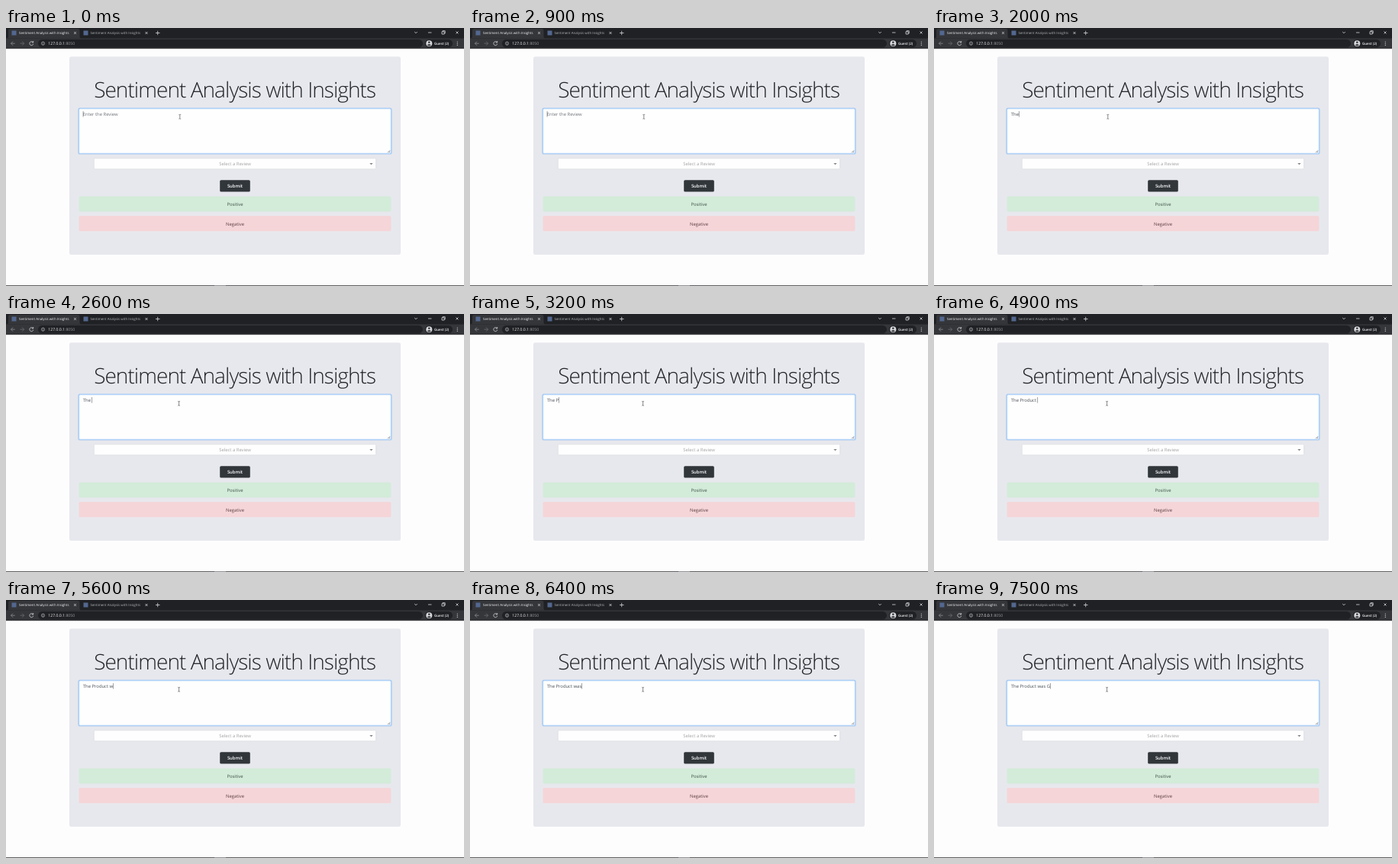
Recreate the animation shown at these times as an HTML page. Size 600x338 px, loop 8000 ms.

```html
<!DOCTYPE html>
<html lang="en">
<head>
<meta charset="utf-8">
<title>Sentiment Analysis with Insights</title>
<style>
  html, body { margin: 0; width: 100%; height: 100%; overflow: hidden; background: #fdfdfe; }
  svg { display: block; width: 600px; height: 338px; }
  text {
    font-family: "Open Sans", "Noto Sans", sans-serif;
    font-size: 5.9px;
    white-space: pre;
    text-rendering: geometricPrecision;
  }
  .heading { font-size: 28px; font-weight: 300; letter-spacing: -.034em; fill: #202327; }
  .tab { font-size: 4.4px; font-weight: 500; }
  .mid { text-anchor: middle; }
  .line { fill: none; stroke: #d5d7da; stroke-width: .8; }
</style>
</head>
<body>
<svg viewBox="0 0 600 338">
  <defs>
    <path id="cross" d="M-1.5-1.5 1.5 1.5M1.5-1.5-1.5 1.5"/>
  </defs>

  <!-- browser tabs -->
  <rect width="600" height="14" fill="#202124"/>
  <path d="M0 13.5Q3 13.5 3 11V3.5Q3 1 5.5 1H94Q96.5 1 96.5 3.5V11Q96.5 13.5 99 13.5Z" fill="#35363a"/>
  <rect x="7.5" y="3.5" width="6" height="6" fill="#52688f"/>
  <rect x="101.5" y="3.5" width="6" height="6" fill="#52688f"/>
  <text class="tab" x="17" y="8.2" fill="#f4f5f6">Sentiment Analysis with Insights</text>
  <text class="tab" x="110.5" y="8.2" fill="#b4b7bb">Sentiment Analysis with Insights</text>
  <g class="line">
    <use href="#cross" x="90.5" y="6.5"/>
    <use href="#cross" x="184" y="6.5"/>
    <path d="M196 6.5H201.5M198.7 3.8V9.2"/>
    <path d="M535.2 5 537 6.8 538.8 5M553 6H557.5"/>
    <path d="M571 4.8H574.2V8H571ZM572 4.8V3.7H575.2V7H574.2"/>
    <use href="#cross" x="591" y="6"/>
  </g>

  <!-- address bar -->
  <rect y="13.5" width="600" height="13.7" fill="#35363a"/>
  <rect x="42" y="15" width="504" height="10.5" rx="5.25" fill="#202124"/>
  <rect x="549" y="15" width="36" height="10.5" rx="5.25" fill="#202124"/>
  <g class="line">
    <path d="M11.7 20.2H6.5M9 17.7 6.5 20.2 9 22.7" stroke="#8f9195"/>
    <path d="M18.5 20.2H23.7M21.2 17.7 23.7 20.2 21.2 22.7" stroke="#6b6d71"/>
    <path d="M35.3 18.6A2.5 2.5 0 1 0 35.8 20.8M35.7 17V19H33.7"/>
    <circle cx="48.5" cy="20.2" r="2.1" stroke-width=".6"/>
    <path d="M48.5 19.9V21.4M48.5 18.8V19.3" stroke-width=".6"/>
  </g>
  <text x="55.3" y="22.1" style="font-size:5.15px" fill="#f1f2f4">127.0.0.1<tspan fill="#999ca1">:8050</tspan></text>
  <circle cx="554.3" cy="20.2" r="4" fill="#d5d7da"/>
  <circle cx="554.3" cy="18.8" r="1.3" fill="#35363a"/>
  <path d="M551.7 22.5Q554.3 19.5 556.9 22.5Q554.3 24.5 551.7 22.5" fill="#35363a"/>
  <text x="561" y="21.9" style="font-size:4.5px;font-weight:600" fill="#f1f2f4">Guest (2)</text>
  <g fill="#d5d7da">
    <circle cx="591.3" cy="18" r=".6"/><circle cx="591.3" cy="20.2" r=".6"/><circle cx="591.3" cy="22.4" r=".6"/>
  </g>

  <!-- page -->
  <rect x="83" y="37.5" width="434" height="259.5" rx="2.3" fill="#e7e8ed"/>
  <text class="heading mid" x="299.6" y="91">Sentiment Analysis with Insights</text>

  <rect x="94.3" y="104.4" width="411.4" height="61.2" rx="2.6" fill="#adcdf2"/>
  <rect x="95.7" y="105.8" width="408.6" height="58.4" rx="1.5" fill="#fefefe" stroke="#80bdff" stroke-width=".4"/>
  <path d="M500.2 163.2 503.2 160.2M501.9 163.2 503.2 161.9" stroke="#444" stroke-width=".6"/>

  <rect x="115.3" y="170.8" width="369.4" height="14" rx="1.3" fill="#fefefe" stroke="#cfd0d4" stroke-width=".5"/>
  <text class="mid" x="300" y="180" fill="#a3a3a6">Select a Review</text>
  <path d="M476.3 177.1H480.7L478.5 179.3Z" fill="#85878b"/>

  <rect x="280.2" y="199.2" width="39.6" height="15.4" rx="1.6" fill="#31363b"/>
  <text class="mid" x="300" y="209.2" font-weight="600" fill="#fff">Submit</text>

  <rect x="95.5" y="220.4" width="409" height="20" rx="1.6" fill="#d3ebd9"/>
  <text class="mid" x="300" y="232.7" fill="#3f5247">Positive</text>
  <rect x="95.5" y="246.2" width="409" height="20" rx="1.6" fill="#f5d5d8"/>
  <text class="mid" x="300" y="258.5" fill="#5c3f43">Negative</text>

  <rect y="337" width="600" height="1" fill="#5f6062"/>
  <rect x="273" y="337" width="15" height="1" fill="#8d9095"/>

  <!-- moving parts -->
  <text id="hint" x="100.8" y="115.3" fill="#70757c">Enter the Review</text>
  <text id="typed" x="100.8" y="115.3" fill="#495057"></text>
  <rect id="caret" y="109" width=".5" height="7.5" fill="#44484d"/>
  <path id="pointer" d="M-1.4-2.8H-.5L0-2.4 .5-2.8H1.4M0-2.4V2.4M-1.4 2.8H-.5L0 2.4 .5 2.8H1.4" fill="none" stroke="#2b2b2b" stroke-width=".55"/>
</svg>
<script>
  const LOOP = 8000;
  const REVIEW = "The Product was G";
  const TEXT_LEFT = 100.8;
  // [time in ms, letters typed, caret visible]
  const STEPS = [
    [0, 0, 1], [400, 0, 0], [900, 0, 1], [1300, 1, 1], [1600, 2, 1], [2000, 3, 1],
    [2200, 4, 1], [2700, 4, 0], [2900, 5, 1], [3400, 6, 1], [3700, 7, 1], [4000, 8, 1],
    [4200, 9, 1], [4400, 10, 1], [4700, 11, 1], [4900, 12, 1], [5400, 12, 0],
    [5600, 13, 1], [5900, 14, 1], [6100, 15, 1], [6700, 15, 0], [7000, 16, 1], [7500, 17, 1]
  ];
  const POINTER_MOVE = 2500;

  const [hint, typed, caret, pointer] =
    ["hint", "typed", "caret", "pointer"].map(id => document.getElementById(id));

  function draw(time) {
    const [, count, visible] = STEPS.findLast(([start]) => start <= time);
    typed.textContent = REVIEW.slice(0, count);
    hint.style.display = count ? "none" : "";
    const width = count ? typed.getComputedTextLength() : 0;
    caret.setAttribute("x", TEXT_LEFT + width);
    caret.style.display = visible ? "" : "none";
    pointer.setAttribute("transform",
      time < POINTER_MOVE ? "translate(227.8 116.2)" : "translate(226.6 117.2)");
  }

  const start = performance.now();
  function tick() {
    draw((performance.now() - start) % LOOP);
    requestAnimationFrame(tick);
  }
  tick();
</script>
</body>
</html>
```
